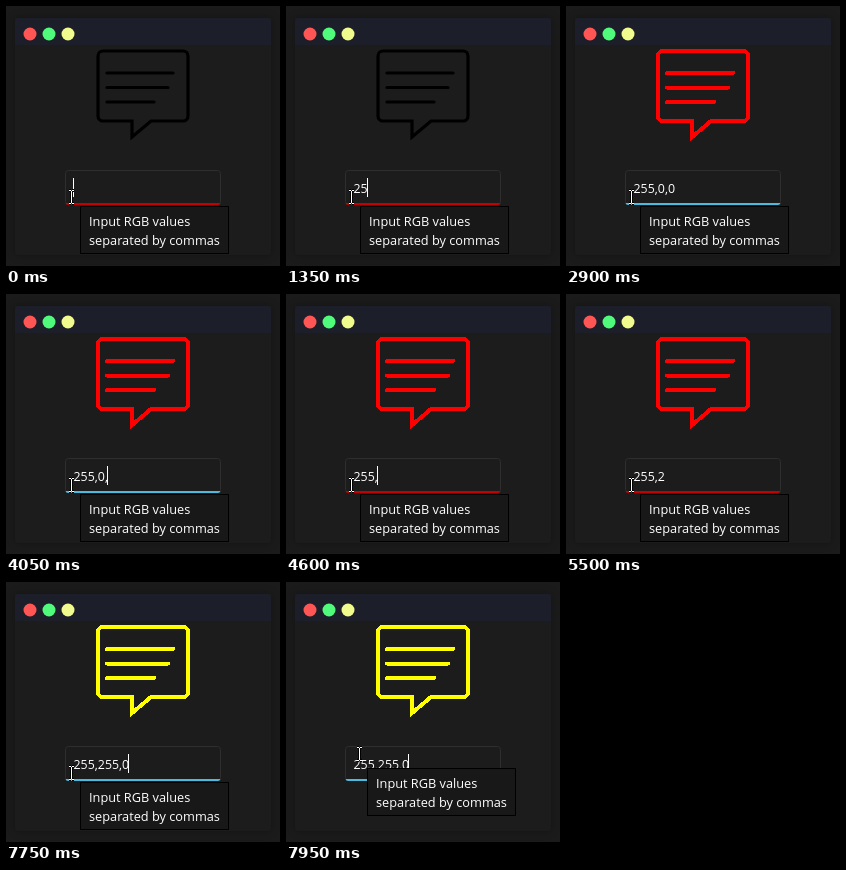
Write an HTML page that moves like this. It is 274 by 260 pixels and loops after 8000 ms.

```html
<!DOCTYPE html>
<html lang="en">
<head>
<meta charset="utf-8">
<title>RGB input</title>
<style>
  html, body { margin: 0; width: 100%; height: 100%; overflow: hidden; background: #1b1b1b; }
  svg { display: block; width: 274px; height: 260px; }
  text { font-family: "Open Sans", "Noto Sans", sans-serif; fill: #fff; }
  #value { font-size: 12.4px; }
  #tip text { font-size: 12.75px; }
  #icon { fill: none; stroke: #000; stroke-width: 3.2; stroke-linecap: round; }
  #icon.tinted { stroke-width: 4; shape-rendering: crispEdges; }
  .window { filter: drop-shadow(0 0 4px rgba(0, 0, 0, .3)); }
</style>
</head>
<body>
<svg viewBox="0 0 274 260">
  <g class="window">
    <path d="M9 12H265V246a3 3 0 0 1-3 3H12a3 3 0 0 1-3-3Z" fill="#1c1c1c"/>
    <path d="M9 39V16a4 4 0 0 1 4-4H261a4 4 0 0 1 4 4V39Z" fill="#1c1f29"/>
  </g>
  <circle cx="24" cy="28" r="6.5" fill="#ff5555"/>
  <circle cx="43" cy="28" r="6.5" fill="#50fa7b"/>
  <circle cx="62" cy="28" r="6.5" fill="#f1fa8c"/>

  <g id="icon">
    <path d="M97 45H177a5 5 0 0 1 5 5V110a5 5 0 0 1-5 5H145L126 131V115H97a5 5 0 0 1-5-5V50a5 5 0 0 1 5-5Z"/>
    <path d="M101 67H167M101 81.500H162M101 96H148"/>
  </g>

  <rect x="59.500" y="164.500" width="155" height="34" rx="3" fill="#1c1c1c" stroke="#2e2e2e"/>
  <path id="underline" d="M59.500 197H214.500Q214 199 212 199H62Q60 199 59.500 197Z"/>
  <text id="value" x="67.5" y="187"></text>
  <rect id="caret" y="172" width="1" height="19" fill="#fff"/>

  <g id="tip">
    <rect x="74.500" y="200.500" width="148" height="47" fill="#181818" stroke="#000"/>
    <text x="83" y="220">Input RGB values</text>
    <text x="83" y="239">separated by commas</text>
  </g>

  <g id="pointer" fill="none">
    <path d="M63 184.500H65M66 184.500H68M65.500 185V197M63 197.500H65M66 197.500H68" stroke="#000" stroke-width="3"/>
    <path d="M63 184.500H65M66 184.500H68M65.500 185V197M63 197.500H65M66 197.500H68" stroke="#fff"/>
  </g>
</svg>
<script>
  const LOOP = 8000;
  const BLINK = { start: 100, period: 675, off: 225 };
  const STEP = 50;
  const RED_LINE = "#c60000", BLUE_LINE = "#4db9dd";

  // Each entry: start time, value of the field.
  const typing = [
    [0, ""], [900, "2"], [1350, "25"], [1450, "255"], [1950, "255,"],
    [2250, "255,0"], [2500, "255,0,"], [2900, "255,0,0"],
    [4050, "255,0,"], [4250, "255,0"], [4500, "255,"],
    [5500, "255,2"], [6250, "255,25"], [6550, "255,255"],
    [7100, "255,255,"], [7400, "255,255,0"]
  ];
  const iconColors = [[0, ""], [2900, "#f00"], [7400, "#ff0"]];
  const lineColors = [[0, RED_LINE], [2900, BLUE_LINE], [4150, RED_LINE], [7400, BLUE_LINE]];

  const [icon, underline, value, caret, tip, pointer] =
    ["icon", "underline", "value", "caret", "tip", "pointer"].map(id => document.getElementById(id));

  const at = (track, t) => track.findLast(([start]) => start <= t)[1];

  function caretVisible(t) {
    const cycle = Math.floor((t + STEP - 1 - BLINK.start) / BLINK.period);
    const floorStep = ms => Math.floor(ms / STEP) * STEP;
    const off = BLINK.start + cycle * BLINK.period;
    return t < floorStep(off) || t >= floorStep(off + BLINK.off);
  }

  function draw(now) {
    const t = now % LOOP;
    const moved = t >= 7950;
    const tint = at(iconColors, t);
    value.textContent = at(typing, t);
    caret.setAttribute("x", Math.floor(67 + value.getComputedTextLength()));
    caret.style.visibility = caretVisible(t) ? "visible" : "hidden";
    icon.style.stroke = tint;
    icon.classList.toggle("tinted", tint !== "");
    underline.style.fill = at(lineColors, t);
    tip.setAttribute("transform", moved ? "translate(7 -14)" : "");
    pointer.setAttribute("transform", moved ? "translate(8 -19)" : "");
  }

  const origin = performance.now();
  function frame() {
    draw(performance.now() - origin);
    requestAnimationFrame(frame);
  }
  frame();
</script>
</body>
</html>
```
